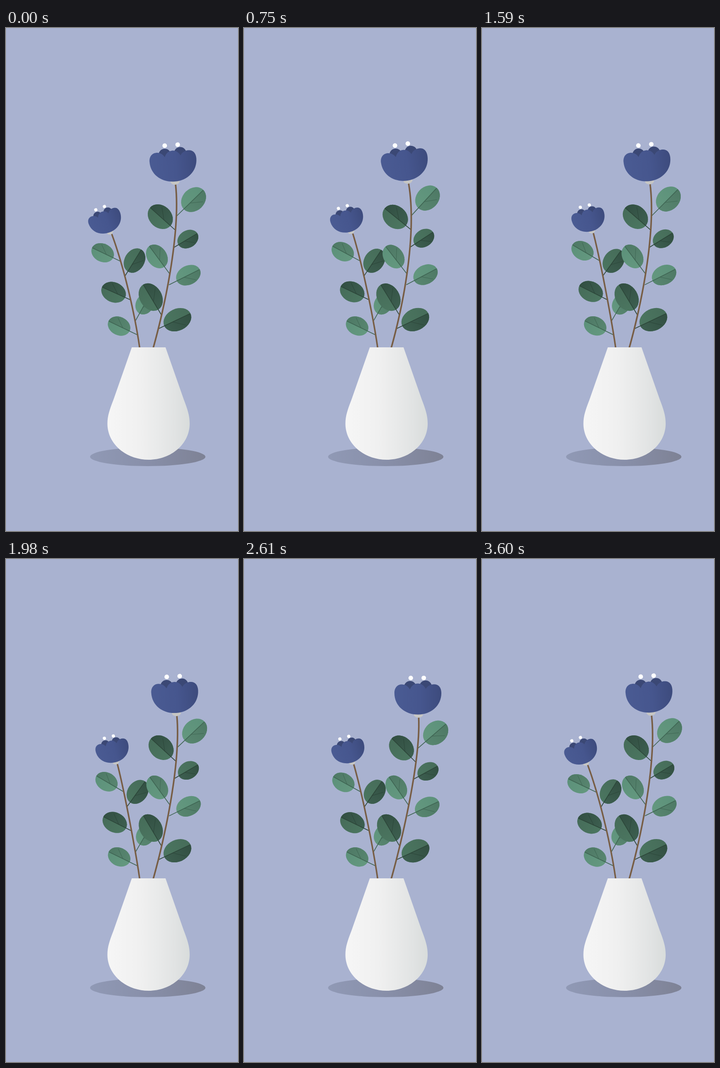
Animation of 509x1101 px, one loop 3630 ms. Source, as an HTML page:

```html
<!DOCTYPE html>
<html lang="en">
<head>
<meta charset="utf-8">
<title>Flowers in a vase</title>
<style>
html, body { margin: 0; width: 100%; height: 100%; overflow: hidden; background: #a9b2d0; }
svg { display: block; width: 100%; height: 100%; }
</style>
</head>
<body>
<svg viewBox="0 0 509 1101">
  <defs>
    <linearGradient id="vase">
      <stop offset="0" stop-color="#f6f6f6"/>
      <stop offset=".4" stop-color="#f0f0f0"/>
      <stop offset=".58" stop-color="#eaebeb"/>
      <stop offset=".82" stop-color="#e1e3e3"/>
      <stop offset="1" stop-color="#d8dcdb"/>
    </linearGradient>
    <linearGradient id="shadow">
      <stop offset="0" stop-color="#9099b5"/>
      <stop offset=".5" stop-color="#888fa9"/>
      <stop offset="1" stop-color="#7e8295"/>
    </linearGradient>
    <linearGradient id="petal">
      <stop offset="0" stop-color="#4a5b93"/>
      <stop offset=".55" stop-color="#46568e"/>
      <stop offset="1" stop-color="#3d4b7d"/>
    </linearGradient>
    <linearGradient id="lightTop"><stop stop-color="#64987f"/><stop offset="1" stop-color="#5c917a"/></linearGradient>
    <linearGradient id="lightLow"><stop stop-color="#588670"/><stop offset="1" stop-color="#4e7965"/></linearGradient>
    <linearGradient id="darkTop"><stop stop-color="#4b7660"/><stop offset="1" stop-color="#466c59"/></linearGradient>
    <linearGradient id="darkLow"><stop stop-color="#3d5f50"/><stop offset="1" stop-color="#324f42"/></linearGradient>
    <clipPath id="crop"><rect y="248" width="509" height="853"/></clipPath>
  </defs>
  <rect width="509" height="1101" fill="#a9b2d0"/>
  <ellipse cx="311" cy="938.5" rx="126.5" ry="20.5" fill="url(#shadow)"/>
  <g id="plants" clip-path="url(#crop)"></g>
  <path fill="url(#vase)" d="M276 699H350L390 813C398 834 403 848 403 866C403 910 363 945 313 945C263 945 222.5 910 222.5 866C222.5 848 228 834 236 813Z"/>
</svg>
<script>
const STEP = 30, LOOP = 3630, SWING = 3600, BASE = 699;

const BODY = 'M-53-54C-53-68-44-73-37-73C-29-73-23-69-19-62C-15-71-9-75-2-75' +
  'C6-75 12-71 16-63C20-70 27-73 34-73C44-73 50-66 50-54C50-26 27-7-1-7C-30-7-53-26-53-54Z';

// Leaves: attach x, y, centre x, y, half length, half width, dark
const plants = [
  {
    stem: [[293.5, 702], [285, 640], [262, 532], [232, 451]], width: 3.3,
    flower: { x: 230.5, y: 451.5, tilt: -21, scale: 0.712 },
    height: 248, reach: 12.6, drop: -0.17, sag: 0, pose: nod,
    leaves: [
      [284.5, 640, 304.5, 604, 24, 19.5, 0],
      [252, 511, 212, 492, 25.7, 19.9, 0],
      [261, 543, 282, 509, 28.3, 21.8, 1],
      [273, 595, 236, 578.5, 27.9, 21.8, 1],
      [289, 672, 248, 652.5, 25.6, 20, 0]
    ]
  },
  {
    stem: [[322.5, 702], [352, 598], [383, 440], [372, 342]], width: 3.4,
    flower: { x: 372, y: 343, tilt: -4.5, scale: 1 },
    height: 357, reach: 11.4, drop: 0.3, sag: 1.1, pose: swing,
    leaves: [
      [375, 411, 411.5, 375.5, 30, 24.3, 0],
      [371, 442, 338.5, 413, 30, 24.3, 1],
      [369, 480, 399, 462, 24.3, 18.9, 1],
      [359, 538, 331, 500, 28.2, 21.4, 0],
      [358, 562, 400, 541, 28.2, 20.9, 0],
      [341, 628, 317.5, 589, 32, 24.3, 1],
      [335, 658, 376, 638.5, 31.8, 23.9, 1]
    ]
  }
];

function add(parent, tag, attrs = {}) {
  const el = document.createElementNS('http://www.w3.org/2000/svg', tag);
  for (const key in attrs) el.setAttribute(key, attrs[key]);
  return parent.appendChild(el);
}

function drawLeaf(parent, [ax, ay, cx, cy, a, b, dark]) {
  const outer = add(parent, 'g');
  const angle = Math.atan2(cy - ay, cx - ax) * 180 / Math.PI;
  const g = add(outer, 'g', { transform: `translate(${cx} ${cy}) rotate(${angle})` });
  const tone = dark ? 'dark' : 'light';
  const line = { stroke: dark ? '#2c4639' : '#3f6553', 'stroke-linecap': 'round', fill: 'none' };
  add(g, 'ellipse', { rx: a, ry: b, fill: `url(#${tone}Top)` });
  add(g, 'path', { d: `M${-a} 0A${a} ${b} 0 0 0 ${a} 0Z`, fill: `url(#${tone}Low)` });
  add(g, 'path', { ...line, d: `M${-Math.hypot(cx - ax, cy - ay)} 0H${a * 0.95}`, 'stroke-width': 1.6 });
  add(g, 'path', { ...line, d: `M${-a * 0.36} 0L${a * 0.36} ${a * 0.58}`, 'stroke-width': 1.2, opacity: 0.75 });
  return outer;
}

function drawFlower(parent, { x, y, tilt, scale }) {
  const outer = add(parent, 'g');
  const g = add(outer, 'g', { transform: `translate(${x} ${y}) rotate(${tilt}) scale(${scale})` });
  const dot = (cx, cy, r, fill) => add(g, 'circle', { cx, cy, r, fill });
  add(g, 'ellipse', { cx: -0.5, cy: -7, rx: 10, ry: 7, fill: '#c6c6c4' });
  dot(-18.5, -67, 13.5, '#3b4875');
  dot(15.5, -68, 13.5, '#3b4875');
  add(g, 'path', { d: BODY, fill: 'url(#petal)' });
  dot(-17, -87, 5, '#fff');
  dot(11.5, -87, 5, '#fff');
  return outer;
}

// Side-to-side sway through the rest pose
function swing(t) {
  const a = 2 * Math.PI * t / SWING;
  return -0.95 * Math.sin(a) + 0.057 * Math.sin(3 * a);
}

// Out and back, easing only at the far end
function nod(t) {
  const p = 1 - Math.abs(1 - 2 * t / SWING);
  return p * (1.1 + p * (0.8 - 0.9 * p));
}

// Offset and turn of the stem at height y
function bend(plant, y, k) {
  const r = Math.max(0, (BASE - y) / plant.height);
  const dx = k * plant.reach * r ** 2.2;
  return {
    dx,
    dy: dx * plant.drop + plant.sag * k * k * r * r,
    turn: 1.08 * 2.2 * k * plant.reach / plant.height * r ** 1.2 * 180 / Math.PI
  };
}

function stemPath(plant, k) {
  const [p0, p1, p2, p3] = plant.stem;
  const points = [];
  for (let i = 0; i <= 30; i++) {
    const u = i / 30, v = 1 - u;
    const at = n => v * v * v * p0[n] + 3 * v * v * u * p1[n] + 3 * v * u * u * p2[n] + u * u * u * p3[n];
    const x = at(0), y = at(1), { dx, dy } = bend(plant, y, k);
    points.push(`${(x + dx).toFixed(2)} ${(y + dy).toFixed(2)}`);
  }
  return 'M' + points.join('L');
}

function build(plant) {
  const g = add(document.getElementById('plants'), 'g');
  plant.parts = plant.leaves.map(leaf => ({ el: drawLeaf(g, leaf), x: leaf[0], y: leaf[1] }));
  plant.line = add(g, 'path', { fill: 'none', stroke: '#775d44', 'stroke-width': plant.width });
  const { x, y } = plant.flower;
  plant.parts.push({ el: drawFlower(g, plant.flower), x, y });
}

function render(t) {
  for (const plant of plants) {
    const k = plant.pose(t);
    plant.line.setAttribute('d', stemPath(plant, k));
    for (const { el, x, y } of plant.parts) {
      const { dx, dy, turn } = bend(plant, y, k);
      el.setAttribute('transform', `translate(${dx} ${dy}) rotate(${turn} ${x} ${y})`);
    }
  }
}

plants.forEach(build);
render(0);
const start = performance.now();
function tick() {
  const t = (performance.now() - start) % LOOP;
  render(Math.floor(t / STEP) * STEP);
  requestAnimationFrame(tick);
}
requestAnimationFrame(tick);
</script>
</body>
</html>
```
